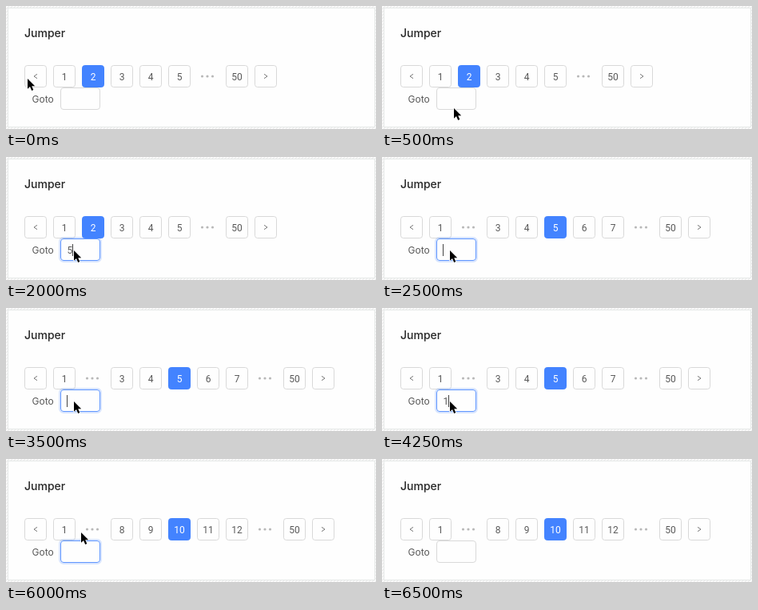
Recreate the animation shown at these times as an HTML page. Size 463x154 px, loop 6.75 s.

```html
<!DOCTYPE html>
<html lang="en">
<head>
<meta charset="utf-8">
<title>Jumper</title>
<style>
html, body { margin: 0; width: 100%; height: 100%; overflow: hidden; }
svg { display: block; }
text { font: 12px Inter, "Open Sans", sans-serif; fill: #595959; }
.digits { font-family: Roboto, sans-serif; }
.title { font-size: 14px; font-weight: 500; fill: #262626; }
.page { fill: #fefefe; stroke: #d9d9d9; }
.page.current { fill: #4383ff; stroke: #4383ff; }
.mid { text-anchor: middle; }
.mid.current { fill: #fff; }
.arrow { fill: none; stroke: #777; }
.dots { fill: #b8b8b8; }
</style>
</head>
<body>
<svg width="463" height="154" viewBox="0 0 463 154">
  <defs>
    <pattern id="hatch" width="4" height="4" patternUnits="userSpaceOnUse">
      <rect width="4" height="4" fill="#fafafa"/>
      <path d="M-1 1L1 -1M0 4L4 0M3 5L5 3" stroke="#e9e9e9"/>
    </pattern>
  </defs>
  <rect width="463" height="154" fill="url(#hatch)"/>
  <rect x="2.5" y="2.5" width="459" height="149" fill="#fefefe" stroke="#e6e9e8"/>
  <text class="title" x="23" y="39">Jumper</text>
  <g id="pager"></g>
  <text x="32.5" y="120.5">Goto</text>
  <rect id="glow" x="67" y="101" width="52" height="30" rx="5" fill="none" stroke="#4383ff" stroke-opacity=".2" stroke-width="2"/>
  <rect id="field" x="68.5" y="102.5" width="49" height="27" rx="3.5" fill="#fefefe"/>
  <text id="value" class="digits" x="76.5" y="121"></text>
  <rect id="caret" y="109" width="1" height="15" fill="#444"/>
  <path id="mouse" d="M2 1V13.8L5 11.1L7.2 16L9.3 15L7.2 10.3H11.2Z" stroke="#fff" stroke-width="1.5" paint-order="stroke" stroke-linejoin="round"/>
</svg>
<script>
const LOOP = 6750, BLINK = 500, FADE = 250, DIGIT = 6.7;
const $ = id => document.getElementById(id);

const actions = [
  [1000, "focus"], [2000, "5"], [2500, "Enter"],
  [4250, "1"], [5000, "0"], [5500, "Enter"], [6500, "blur"]
];
// Pointer stops: each holds until the next one.
const stops = [
  [0, 25, 90], [250, 33, 94], [500, 88, 127], [750, 88, 126],
  [1000, 90, 121], [1500, 83, 116], [6000, 92, 91]
];
const POINTER_GONE = 6250;

// Replays the user's actions up to time t.
function stateAt(t) {
  const s = { page: 2, value: "", focused: null, last: 0 };
  for (const [time, key] of actions) {
    if (time > t) break;
    s.last = time;
    if (key === "focus") s.focused = time;
    else if (key === "blur") s.focused = null;
    else if (key === "Enter") { s.page = +s.value; s.value = ""; }
    else s.value += key;
  }
  return s;
}

function slots(page) {
  if (page < 4) return ["<", 1, 2, 3, 4, 5, "…", 50, ">"];
  const near = [-2, -1, 0, 1, 2].map(d => page + d);
  return ["<", 1, "…", ...near, "…", 50, ">"];
}

function slot(label, x, page) {
  const mid = x + 14;
  if (label === "…")
    return [-1, 0, 1].map(i => `<circle class="dots" cx="${mid - 1 + 6.5 * i}" cy="88" r="1.6"/>`).join("");
  const current = label === page ? "current" : "";
  const box = `<rect class="page ${current}" x="${x + .5}" y="74.5" width="27" height="27" rx="3.2"/>`;
  if (label === "<" || label === ">") {
    const s = label === "<" ? 2 : -2;
    return box + `<path class="arrow" d="M${mid + s} 85.3l${-2 * s} 2.7l${2 * s} 2.7"/>`;
  }
  return box + `<text class="digits mid ${current}" x="${mid}" y="93">${label}</text>`;
}

let shown;
function draw(t) {
  const { page, value, focused, last } = stateAt(t);
  if (page !== shown) {
    shown = page;
    $("pager").innerHTML = slots(page).map((s, i) => slot(s, 23 + 36 * i, page)).join("");
  }

  const active = focused !== null;
  const glowing = active && t - focused >= FADE;
  $("field").setAttribute("stroke", glowing ? "#5f96ff" : active ? "#86aefa" : "#d9d9d9");
  $("glow").style.opacity = +glowing;
  $("value").textContent = value;

  // The caret only blinks in the empty field.
  const lit = active && (value || (t - last) % (2 * BLINK) < BLINK);
  $("caret").style.opacity = lit ? 1 : 0;
  $("caret").setAttribute("x", 76 + Math.round(DIGIT * value.length));

  const [, x, y] = stops.findLast(([time]) => time <= t);
  $("mouse").setAttribute("transform", `translate(${x} ${y})`);
  $("mouse").style.opacity = t < POINTER_GONE ? 1 : 0;
}

let start;
function tick(now) {
  start ??= now;
  draw((now - start) % LOOP);
  requestAnimationFrame(tick);
}
draw(0);
requestAnimationFrame(tick);
</script>
</body>
</html>
```
